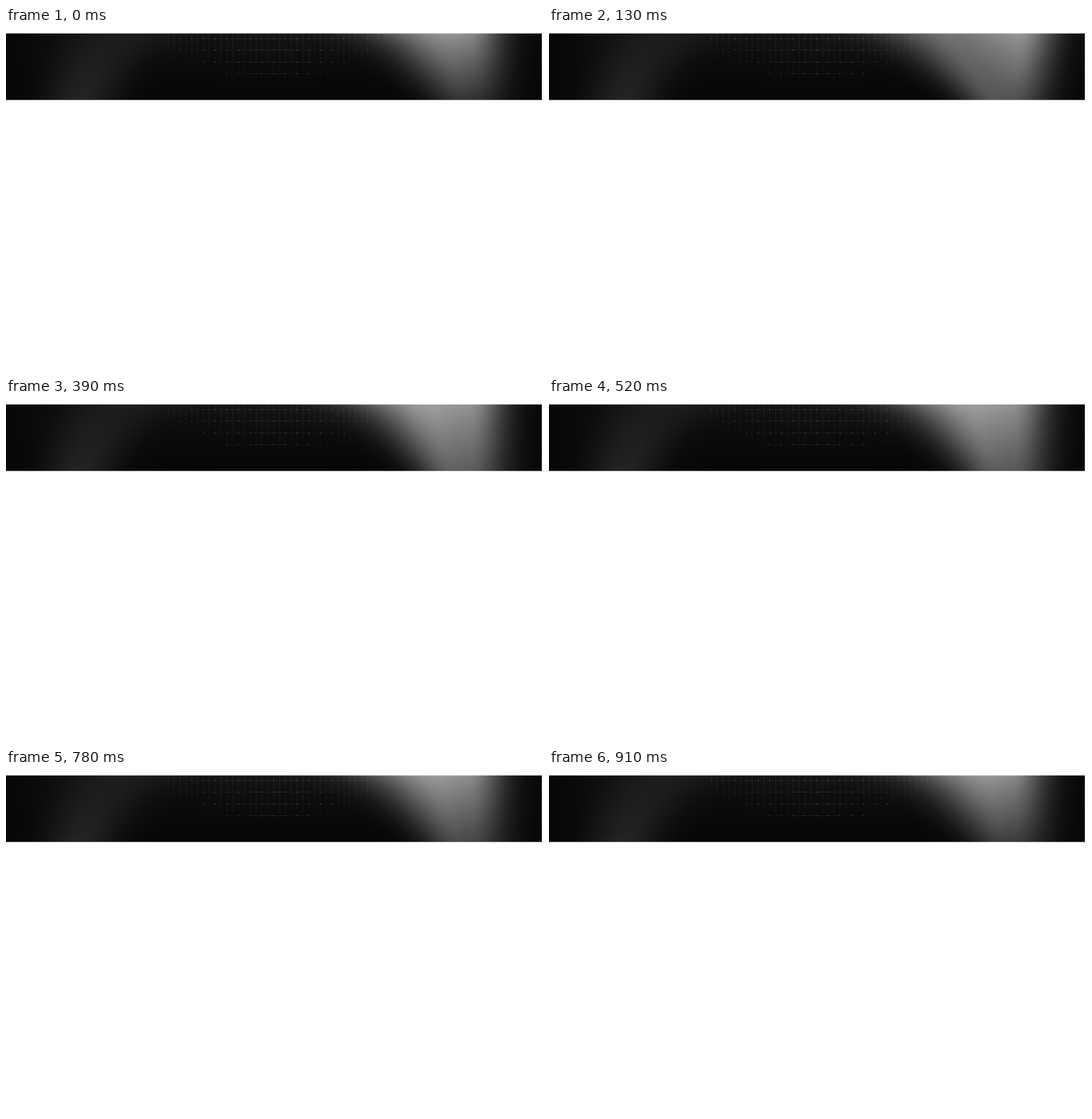
These frames come from a looping animation (937x598 px, 1.04 s). An HTML page with a canvas:

```html
<!DOCTYPE html>
<html lang="en">
<head>
<meta charset="utf-8">
<title>Glow strip</title>
<style>
  html, body { margin: 0; width: 100%; height: 100%; overflow: hidden; background: #fff; }
  canvas { display: block; }
</style>
</head>
<body>
<canvas id="stage" width="937" height="598"></canvas>
<script>
const STEP = 130;
const TOP = 9, WIDTH = 935, HEIGHT = 117;
const PITCH = 20.4;

// crest: x of the glow's crest at the top; edge: x where its right side falls off
// crestLevel, edgeLevel: brightness at the top; floor, footX: brightness and x at the bottom
const pose = (crest, edge, crestLevel, edgeLevel, floor, footX) =>
  ({ crest, edge, crestLevel, edgeLevel, floor, footX });
const poses = [
  pose(774, 800, 140, 134, 46, 800),
  pose(715, 818, 106, 142, 78, 782),
  pose(740, 806, 144, 132, 92, 778),
  pose(745, 804, 150, 140, 90, 779),
  pose(746, 803, 150, 140, 85, 780),
  pose(752, 802, 148, 138, 76, 785),
  pose(758, 801, 146, 136, 67, 790),
  pose(768, 800, 142, 134, 56, 796)
];

const mix = (a, b, t) => a + (b - a) * t;
const bell = (d, sigma) => Math.exp(-d * d / (2 * sigma * sigma));

function rightGlow(x, v, p) {
  const arch = Math.sqrt(v);
  const crest = mix(p.crest, p.footX, v);
  const edge = Math.max(crest, mix(p.edge, 806, v));
  const drop = v ** 0.9;
  const a = mix(p.crestLevel, p.floor, drop);
  const b = mix(p.edgeLevel, p.floor * 0.95, drop);
  if (x < crest) return a * bell(crest - x, mix(102, 43, arch));
  if (x > edge) return b * bell(x - edge, 45);
  return mix(a, b, (x - crest) / (edge - crest || 1));
}

function brightness(x, v, p) {
  const arch = Math.sqrt(v);
  const leftGlow = mix(18, 29, v) * bell(x - mix(205, 128, arch), mix(80, 44, arch));
  const haze = 14 * bell(x - 460, 180) * (1 - v) ** 1.3;
  return 6 + leftGlow + haze + rightGlow(x, v, p);
}

function drawLattice(g) {
  const reach = (x, y) => Math.max(0, 1 - ((x - 466) / 205) ** 2 - (y / 98) ** 2);
  for (let i = 0; i < 38; i++) {
    const x = Math.round(283 + i * PITCH / 2);
    const depth = 92 * Math.sqrt(reach(x, 0));
    const fade = g.createLinearGradient(0, 0, 0, depth + 1);
    fade.addColorStop(0, `rgba(110,110,100,${i % 2 ? 0.2 : 0.1})`);
    fade.addColorStop(1, "rgba(110,110,100,0)");
    g.fillStyle = fade;
    g.fillRect(x, 0, 1, depth);
  }
  [[283, 19], [304, 17], [345, 13], [385, 9]].forEach(([start, count], row) => {
    const y = Math.round(9 + row * PITCH);
    const span = (count - 1) * PITCH;
    const fade = g.createLinearGradient(start, 0, start + span, 0);
    fade.addColorStop(0, "rgba(110,110,90,0)");
    fade.addColorStop(0.5, "rgba(110,110,90,0.2)");
    fade.addColorStop(1, "rgba(110,110,90,0)");
    g.fillStyle = fade;
    g.fillRect(start, y, span, 1);
    for (let i = 0; i < count; i++) {
      const x = Math.round(start + i * PITCH);
      g.fillStyle = `rgba(125,125,100,${0.5 + 0.4 * reach(x, y)})`;
      g.fillRect(x - 1, y, 2, 1);
    }
  });
}

function renderStrip(p) {
  const strip = document.createElement("canvas");
  strip.width = WIDTH;
  strip.height = HEIGHT;
  const g = strip.getContext("2d");
  const image = g.createImageData(WIDTH, HEIGHT);
  for (let y = 0, i = 0; y < HEIGHT; y++) {
    for (let x = 0; x < WIDTH; x++, i += 4) {
      const level = brightness(x, y / (HEIGHT - 1), p);
      image.data[i] = image.data[i + 1] = image.data[i + 2] = level;
      image.data[i + 3] = 255;
    }
  }
  g.putImageData(image, 0, 0);
  drawLattice(g);
  // Soft outer rows: the strip begins and ends halfway through a pixel.
  g.fillStyle = "rgba(255,255,255,0.5)";
  g.fillRect(0, 0, WIDTH, 1);
  g.fillRect(0, HEIGHT - 1, WIDTH, 1);
  return strip;
}

const strips = poses.map(renderStrip);
const ctx = document.getElementById("stage").getContext("2d");
const start = performance.now();

function draw() {
  const elapsed = performance.now() - start;
  const index = Math.floor(elapsed / STEP) % strips.length;
  ctx.fillStyle = "#fff";
  ctx.fillRect(0, 0, 937, 598);
  ctx.drawImage(strips[index], 0, TOP);
  requestAnimationFrame(draw);
}
draw();
</script>
</body>
</html>
```
